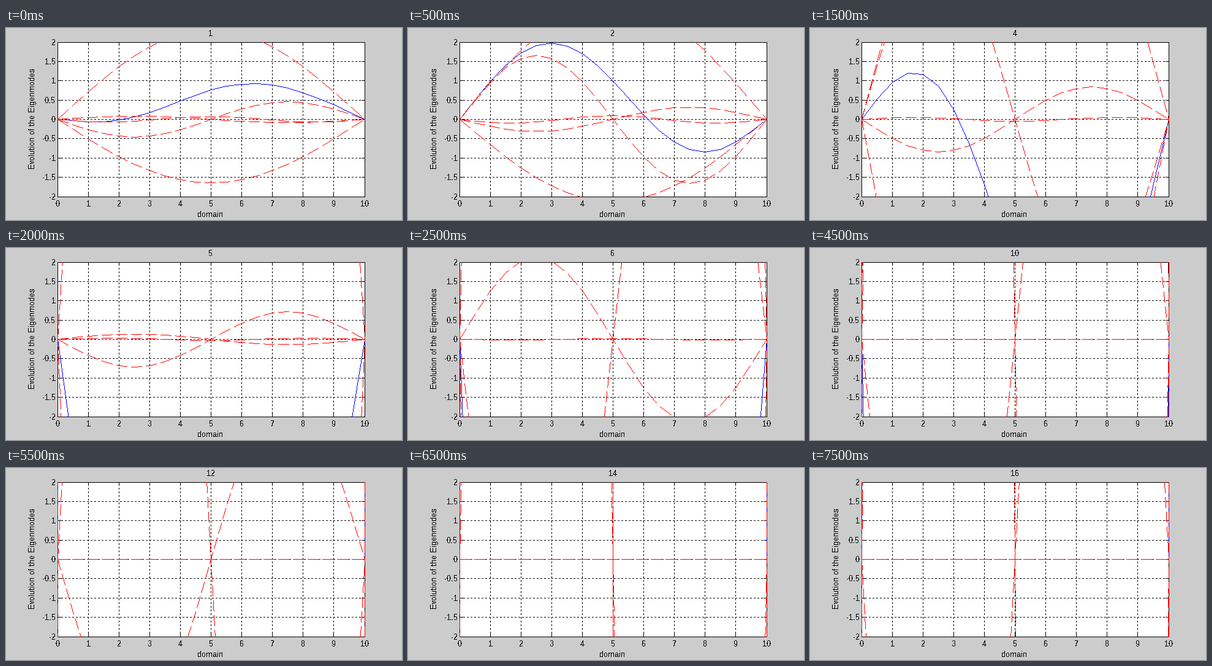
A matplotlib script that plays this animation: 646x312 px, repeating every 8 s.

```python
import numpy as np
import matplotlib.pyplot as plt
from matplotlib.animation import FuncAnimation

W, H, DPI = 646, 312, 64
PX = 72 / DPI                       # one pixel in points
LEFT, RIGHT, TOP, BOTTOM = 84, 585, 23, 274
FRAMES, INTERVAL = 16, 500
GRAY, WHITE, BLACK = (204, 204, 204), (255, 255, 255), (0, 0, 0)
RED, BLUE = (255, 0, 0), (0, 0, 255)
SOLID, DOTTED, DASHED = (1, 1), (3, 6), (18, 24)    # pixels on, period

plt.rcParams.update({
    "font.family": "Liberation Sans",
    "font.size": 13 * PX,
    "text.antialiased": False,
    "text.hinting": "native",
    "text.hinting_factor": 1,
})

# wave number, amplitude, growth rate, frequency, phase
MODES = [
    (1, 1.319, 0.82, 0.43, 0.249),
    (2, -1.28, 0.40, 0.865, 0.463),
    (3, 0.181, -0.30, 1.25, 0.868),
]
RATIOS = {1: -0.705, 2: -1 / 5.35}  # second component relative to the first

x = np.linspace(0, 10, 21)


def col(v):
    return np.floor(LEFT + (RIGHT - LEFT) * np.asarray(v) / 10)


def row(v):
    return np.floor(TOP + (BOTTOM - TOP) * (2 - np.asarray(v)) / 4)


def components(t):
    curves = []
    for n, amp, rate, freq, phase in MODES:
        u = amp * np.exp(rate * t) * np.cos(freq * t + phase) * np.sin(n * np.pi * x / 10)
        curves.append(u)
        if n in RATIOS:
            curves.append(RATIOS[n] * u)
    return curves


def stroke(img, cols, rows, color, style=SOLID):
    """Draw a one-pixel polyline, clipped to the plot window."""
    on, period = style
    count = 0
    for x0, y0, x1, y1 in zip(cols[:-1], rows[:-1], cols[1:], rows[1:]):
        dx, dy = x1 - x0, y1 - y0
        lo, hi = sorted(((TOP - y0) / dy, (BOTTOM - y0) / dy)) if dy else (0, 1)
        a, b = max(0, lo), min(1, hi)
        if a >= b:
            continue
        if a > 0:
            count = 0
        n = max(1, round(max(abs(dx), abs(dy)) * (b - a)))
        k = np.arange(n + 1)
        s = (a + (b - a) * k / n)[(count + k) % period < on]
        img[np.rint(y0 + dy * s).astype(int), np.rint(x0 + dx * s).astype(int)] = color
        count += n


def make_base():
    img = np.empty((H, W, 3), np.uint8)
    img[:] = GRAY
    img[TOP:BOTTOM + 1, LEFT:RIGHT + 1] = WHITE
    for c in col(np.arange(11)):
        if LEFT < c < RIGHT:
            stroke(img, (c, c), (BOTTOM, TOP), BLACK, DOTTED)
        stroke(img, (c, c), (BOTTOM, BOTTOM - 5), BLACK)
        stroke(img, (c, c), (TOP, TOP + 5), BLACK)
    for r in row(np.arange(-2, 2.1, 0.5)):
        if TOP < r < BOTTOM:
            stroke(img, (LEFT, RIGHT), (r, r), BLACK, DOTTED)
        stroke(img, (LEFT, LEFT + 5), (r, r), BLACK)
        stroke(img, (RIGHT, RIGHT - 5), (r, r), BLACK)
    stroke(img, (LEFT, RIGHT, RIGHT, LEFT, LEFT),
           (TOP, TOP, BOTTOM, BOTTOM, TOP), BLACK)
    return img


fig = plt.figure(figsize=(W / DPI, H / DPI), dpi=DPI, facecolor="#cccccc")
ax = fig.add_axes([0, 0, 1, 1])
ax.axis("off")
base = make_base()
plot = ax.imshow(base, extent=(0, W, H, 0), interpolation="nearest", aspect="auto")

for k in range(11):
    ax.text(col(k) + 0.5, 290, str(k), ha="center", va="baseline")
for v in np.arange(-2, 2.1, 0.5):
    ax.text(81, row(v) + 5, f"{v:g}", ha="right", va="baseline")
ax.text(333, 307, "domain", ha="center", va="baseline")
ax.text(50, 147, "Evolution of the Eigenmodes", rotation=90, ha="right", va="center")
title = ax.text(334, 13, "", ha="center", va="baseline")


def update(i):
    step = i + 1
    curves = components(step)
    img = base.copy()
    # the sum uses every component, below the dashed parts
    stroke(img, col(x), row(sum(curves)), BLUE)
    for u in curves:
        stroke(img, col(x), row(u), RED, DASHED)
    plot.set_data(img)
    title.set_text(str(step))
    return plot, title


anim = FuncAnimation(fig, update, frames=FRAMES, interval=INTERVAL,
                     repeat=True, repeat_delay=0, blit=False)
plt.show()
```
